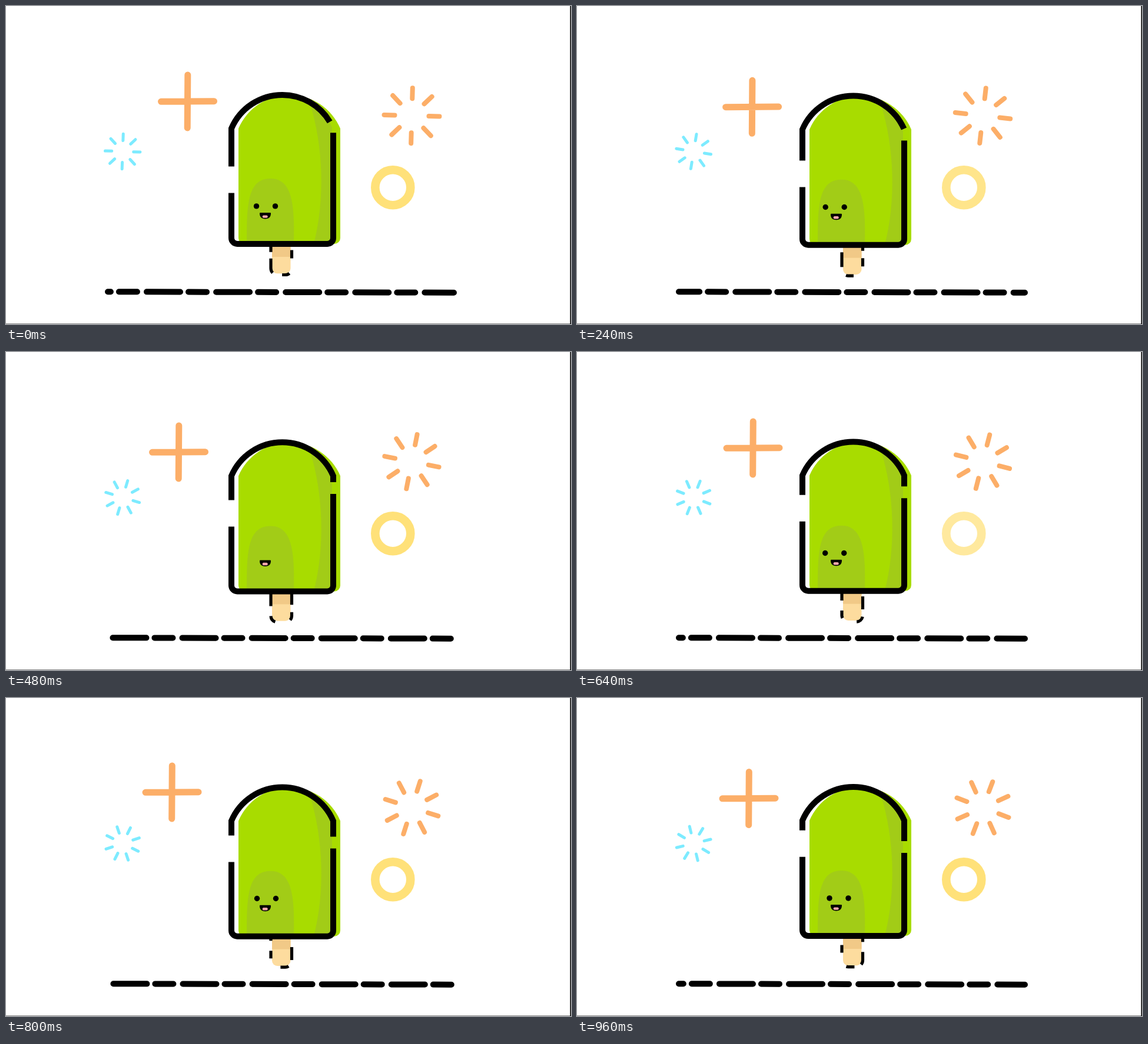
An HTML page with a canvas that plays this animation: 960 by 540 pixels, repeating every 1 s.

```html
<!DOCTYPE html>
<html>
<head>
<meta charset="utf-8">
<title>Ice lolly</title>
<style>
html, body { margin: 0; width: 100%; height: 100%; overflow: hidden; background: #fff; }
canvas { display: block; }
</style>
</head>
<body>
<canvas id="stage" width="960" height="540"></canvas>
<script>
const ctx = document.getElementById('stage').getContext('2d');
const LOOP = 1000, STEP = 40, KEY = 160;

// Outline runs clockwise from the middle of the bottom edge
const body = new Path2D('M469.5 404H393A10 10 0 0 1 383 394V208A94.1 94.1 0 0 1 556 208V394A10 10 0 0 1 546 404Z');
const shade = new Path2D('M516 163.5A94 94 0 0 1 554 206V404H523C542 330 540 240 516 163.5Z');
const cheek = new Path2D('M409 402C409 338 410 293 449.5 293C489 293 490 345 489 402Z');
const mouth = new Path2D('M432 351H449Q450 351 450 352C450 358 447 361.5 440.5 361.5S431 358 431 352Q431 351 432 351Z');
const stickRim = new Path2D('M485.5 404V445.5A11 11 0 0 1 474.5 456.5H461A11 11 0 0 1 450 445.5V404');
const ground = new Path2D('M173 485.2L761 486.7');

const plusX = [308.5, 297.5, 298.5, 293.5, 299, 282, 292];
const plusY = [162, 161.5, 180, 170, 163, 160, 170.5];
const eyeX = [425.5, 423, 421.7, 421.7, 421.7, 426.5, 429];
const ringAlpha = [1, 1, .72, 1, .72, 1, 1];

function linear(keys, u) {
  const i = Math.floor(u), a = keys[i], b = keys[i + 1] ?? a;
  return a + (b - a) * (u - i);
}

// Catmull-Rom through evenly spaced keys
function smooth(keys, u) {
  const i = Math.floor(u), f = u - i;
  const at = n => keys[Math.max(0, Math.min(keys.length - 1, n))];
  const [a, b, c, d] = [at(i - 1), at(i), at(i + 1), at(i + 2)];
  return b + f / 2 * (c - a + f * (2 * a - 5 * b + 4 * c - d + f * (3 * (b - c) + d - a)));
}

function fill(path, color) {
  ctx.fillStyle = color;
  ctx.fill(path);
}

function stroke(path, color, width, cap = 'butt', dash = [], offset = 0) {
  ctx.strokeStyle = color;
  ctx.lineWidth = width;
  ctx.lineCap = cap;
  ctx.setLineDash(dash);
  ctx.lineDashOffset = offset;
  ctx.stroke(path);
}

function roundRect(x, y, w, h, r, color) {
  const p = new Path2D();
  p.roundRect(x, y, w, h, r);
  fill(p, color);
}

function burst(x, y, inner, outer, width, color, degrees) {
  const p = new Path2D();
  for (let i = 0; i < 8; i++) {
    const a = (degrees + i * 45) * Math.PI / 180, c = Math.cos(a), s = Math.sin(a);
    p.moveTo(x + inner * c, y + inner * s);
    p.lineTo(x + outer * c, y + outer * s);
  }
  stroke(p, color, width, 'round');
}

function plus(x, y) {
  stroke(new Path2D(`M${x - 45} ${y + .3}L${x + 45} ${y - .3}M${x + .3} ${y - 45}L${x - .3} ${y + 45}`),
    '#fcae68', 11, 'round');
}

function ring(alpha) {
  const p = new Path2D();
  p.arc(657.3, 308.2, 30, 0, 7);
  ctx.globalAlpha = alpha;
  stroke(p, '#ffe179', 14.6);
  ctx.globalAlpha = 1;
}

function face(x, open) {
  for (const cx of [x, x + 32]) {
    const eye = new Path2D();
    eye.ellipse(cx, 339.9, 4.7, 4.7 * open, 0, 0, 7);
    if (open > 0) fill(eye, '#000');
  }
  fill(mouth, '#000');
  roundRect(435.7, 355.4, 9, 4.4, 2, '#f9a8ac');
}

function lolly(t, u) {
  const bob = t < 400 ? 1 - Math.cos(Math.PI * t / 400) : 1 + Math.cos(Math.PI * (t - 400) / 600);
  const open = Math.min(1, Math.abs(t - 480) / 80);
  ctx.save();
  ctx.translate(0, 1.25 * bob);

  roundRect(452, 400, 31.5, 54.3, [0, 0, 9, 9], '#fddc9e');
  roundRect(452, 400, 31.5, 26, 0, '#f1c987');
  stroke(stickRim, '#000', 5.2, 'butt',
    [19, 17, 22, 12.5, 14, 26.5, 13, 17, 25, 11, 40, 40], 60 - 8 * u - .09 * u * u);

  ctx.save();
  ctx.translate(12, 0);
  fill(body, '#a8dc00');
  ctx.restore();
  fill(shade, '#a2cc17');
  fill(cheek, '#a2cc17');
  face(smooth(eyeX, u), open);
  stroke(body, '#000', 10, 'butt', [168.7 + 7.59 * u + .06 * u * u, 45, 271, 20, 999, 0]);
  ctx.restore();
}

function draw(t) {
  const u = t / KEY;
  ctx.fillStyle = '#fff';
  ctx.fillRect(0, 0, 960, 540);

  plus(smooth(plusX, u), smooth(plusY, u));
  burst(198.2, 247, 18.5, 29.7, 5, '#7debff', 2 + 4.9 * u);
  burst(689.5, 186.2, 29, 47, 8, '#fcae68', 1.6 + 3.2 * u);
  ring(linear(ringAlpha, u));
  lolly(t, u);
  stroke(ground, '#000', 10, 'round', [57, 14, 31, 16.1], 52.1 + .366 * t);

  ctx.fillStyle = '#888';
  ctx.fillRect(0, 539, 960, 1);
  ctx.fillStyle = '#000';
  ctx.fillRect(958.5, 0, 1.5, 540);
}

const start = performance.now();
function tick() {
  const t = (performance.now() - start) % LOOP;
  draw(Math.floor(t / STEP) * STEP);
  requestAnimationFrame(tick);
}
tick();
</script>
</body>
</html>
```
